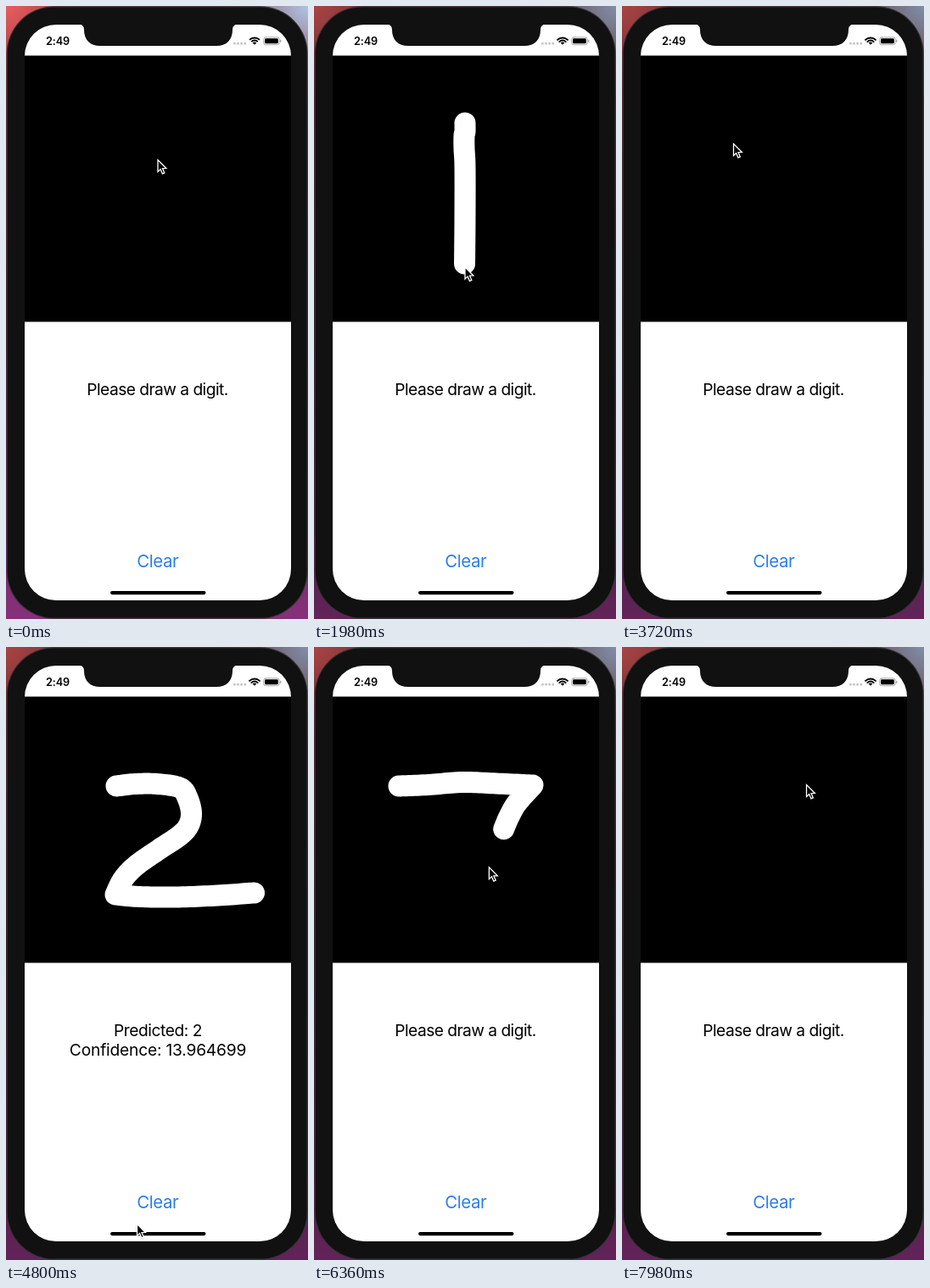
Recreate the animation shown at these times as an HTML page with a canvas. Size 356 px wide and 723 px high, loop 8 s.

```html
<!DOCTYPE html>
<html lang="en">
<head>
<meta charset="utf-8">
<title>Digit drawing</title>
<style>
html, body { margin: 0; width: 100%; height: 100%; overflow: hidden; background: #111; }
canvas { display: block; width: 356px; height: 723px; }
</style>
</head>
<body>
<canvas id="stage"></canvas>
<script>
const W = 356, H = 723, LOOP = 8000, STEP = 60, LAG = 75;
const FONT = 'Inter, Roboto, "Liberation Sans", sans-serif';
const canvas = document.getElementById('stage');
const dpr = window.devicePixelRatio || 1;
canvas.width = W * dpr;
canvas.height = H * dpr;
const ctx = canvas.getContext('2d');

const clamp = v => Math.max(0, Math.min(1, v));
const smooth = v => v * v * (3 - 2 * v);
const linear = v => v;

// Catmull-Rom curve; a repeated point makes a corner.
function curve(pts) {
  const out = [];
  for (let i = 0; i < pts.length - 1; i++) {
    const a = pts[Math.max(0, i - 1)], b = pts[i], c = pts[i + 1];
    const d = pts[Math.min(pts.length - 1, i + 2)];
    if (b[0] === c[0] && b[1] === c[1]) continue;
    for (let k = 0; k < 12; k++) {
      const u = k / 12;
      out.push([0, 1].map(j => 0.5 * (2 * b[j] + (c[j] - a[j]) * u +
        (2 * a[j] - 5 * b[j] + 4 * c[j] - d[j]) * u * u +
        (3 * b[j] - a[j] - 3 * c[j] + d[j]) * u * u * u)));
    }
  }
  out.push(pts[pts.length - 1]);
  return out;
}

// The part of a polyline up to a fraction of its length.
function partOf(line, p) {
  const gap = i => Math.hypot(line[i][0] - line[i - 1][0], line[i][1] - line[i - 1][1]);
  let left = 0;
  for (let i = 1; i < line.length; i++) left += gap(i);
  left *= p;
  const out = [line[0]];
  for (let i = 1; i < line.length; i++) {
    const len = gap(i);
    if (len >= left) {
      const u = len ? left / len : 0, a = line[i - 1], b = line[i];
      out.push([a[0] + (b[0] - a[0]) * u, a[1] + (b[1] - a[1]) * u]);
      break;
    }
    out.push(line[i]);
    left -= len;
  }
  return out;
}

const digits = [
  { from: 780, to: 1980, read: 2340, clear: 3240, ease: v => smooth(v) ** 1.84,
    label: '1', score: '7.4308753',
    line: curve([[178, 138], [178, 148], [177, 153], [177, 168], [178, 190], [178, 250], [177.5, 307.5]]) },
  { from: 3780, to: 4470, read: 4500, clear: 5580, ease: linear,
    label: '2', score: '13.964699',
    line: curve([[130, 164], [152, 161.5], [178, 161.5], [205, 166], [214, 178], [218.5, 196],
      [215, 211], [204, 223], [180, 239], [153, 258], [138, 274], [129, 292], [129, 292],
      [158, 294.5], [200, 295], [250, 293], [292.5, 290]]) },
  { from: 5940, to: 6445, read: 6540, clear: 7620, ease: linear,
    label: '7', score: '10.482617',
    line: curve([[100, 164], [135, 162.5], [175, 159.5], [215, 161], [258, 163], [258, 163],
      [240, 183], [231, 198], [224, 214], [206, 259], [189, 311]]) }
];
const progress = (d, t) => d.ease(clamp((t - d.from) / (d.to - d.from)));

// Pointer glides: start, end, x, y
const moves = [
  [0, 0, 178.5, 181], [0, 540, 177.5, 138],
  [2340, 3000, 199, 651], [3240, 3700, 131, 162],
  [4480, 4800, 154, 680], [4800, 5280, 181, 651], [5600, 5930, 100, 164],
  [6540, 7320, 173, 646], [7620, 7980, 217, 162]
];

function pointer(t) {
  let x = 0, y = 0;
  const stops = moves.map(m => ({ at: m[0], move: m }))
    .concat(digits.map(d => ({ at: d.from, digit: d })))
    .sort((a, b) => a.at - b.at);
  for (const s of stops) {
    if (t < s.at) break;
    if (s.digit) {
      const part = partOf(s.digit.line, progress(s.digit, t));
      [x, y] = part[part.length - 1];
    } else {
      const [a, b, tx, ty] = s.move;
      const u = b > a ? smooth(clamp((t - a) / (b - a))) : 1;
      x += (tx - x) * u;
      y += (ty - y) * u;
    }
  }
  return [x, y];
}

function box(x, y, w, h, r, color) {
  ctx.beginPath();
  ctx.roundRect(x, y, w, h, r);
  ctx.fillStyle = color;
  ctx.fill();
}

function text(str, x, y, size, color = '#000', track = 0, weight = 400) {
  ctx.font = `${weight} ${size}px ${FONT}`;
  ctx.letterSpacing = track + 'px';
  ctx.textAlign = 'center';
  ctx.fillStyle = color;
  ctx.fillText(str, x, y);
}

function glow(x, y, r, color) {
  const g = ctx.createRadialGradient(x, y, 0, x, y, r);
  g.addColorStop(0, color);
  g.addColorStop(1, color + '00');
  ctx.fillStyle = g;
  ctx.fillRect(0, 0, W, H);
}

function wallpaper(focused) {
  const g = ctx.createLinearGradient(0, 0, 0, H);
  g.addColorStop(0, '#8f3b45');
  g.addColorStop(0.5, '#4a2434');
  g.addColorStop(1, '#86307a');
  ctx.fillStyle = g;
  ctx.fillRect(0, 0, W, H);
  glow(0, 0, 100, '#e85d5c');
  glow(W, 0, 110, '#afc3e4');
  if (focused) {
    ctx.fillStyle = 'rgba(0,0,0,0.27)';
    ctx.fillRect(0, 0, W, H);
  }
}

function phone() {
  box(0.7, 0.3, 355, 722.4, 56, '#343436');
  box(1.8, 1.4, 352.8, 720.2, 55, '#111111');
  box(22, 22, 314, 679, 37, '#fff');
  ctx.fillStyle = '#111111';
  ctx.beginPath();
  ctx.moveTo(86, 21.5);
  ctx.quadraticCurveTo(92, 22, 92, 28);
  ctx.bezierCurveTo(92, 40, 99, 47, 111, 47);
  ctx.lineTo(248, 47);
  ctx.bezierCurveTo(260, 47, 267, 40, 267, 28);
  ctx.quadraticCurveTo(267, 22, 273, 21.5);
  ctx.fill();
}

function status() {
  text('2:49', 61, 45.8, 12.7, '#000', -0.1, 600);
  for (let i = 0; i < 4; i++) box(268 + i * 4.1, 42.8, 2.8, 2.8, 1.2, '#c4c4c4');
  ctx.strokeStyle = ctx.fillStyle = '#000';
  ctx.lineWidth = 2;
  const a = Math.PI * 1.25, b = Math.PI * 1.75;
  for (const r of [8.4, 5.2]) {
    ctx.beginPath();
    ctx.arc(293, 45.8, r, a, b);
    ctx.stroke();
  }
  ctx.beginPath();
  ctx.moveTo(293, 45.8);
  ctx.arc(293, 45.8, 3.2, a, b);
  ctx.fill();
  ctx.lineWidth = 0.9;
  ctx.strokeStyle = '#a0a0a0';
  ctx.beginPath();
  ctx.roundRect(303.6, 36.9, 18.6, 8.8, 2.6);
  ctx.stroke();
  box(305, 38.3, 15.8, 6, 1.4, '#000');
  box(323.1, 39.7, 1.2, 3.2, 0.6, '#a0a0a0');
}

function ink(t) {
  const d = digits.find(d => t >= d.from && t < d.clear);
  if (!d) return;
  const part = partOf(d.line, progress(d, t - LAG));
  ctx.strokeStyle = '#fff';
  ctx.lineWidth = 25;
  ctx.lineCap = ctx.lineJoin = 'round';
  ctx.beginPath();
  ctx.moveTo(...part[0]);
  part.slice(1).forEach(p => ctx.lineTo(...p));
  ctx.stroke();
}

function labels(t) {
  const d = digits.find(d => t >= d.read && t < d.clear);
  if (d) {
    text('Predicted: ' + d.label, 179, 458.8, 19.2, '#000', -0.45);
    text('Confidence: ' + d.score, 179, 482.3, 19.2, '#000', -0.2);
  } else {
    text('Please draw a digit.', 178.5, 458.8, 19.2, '#000', -0.55);
  }
  const pressed = digits.find(d => t >= d.clear - 60 && t < d.clear + 300);
  ctx.globalAlpha = pressed ? 0.25 + 0.75 * clamp((t - pressed.clear) / 300) : 1;
  text('Clear', 178.7, 661.8, 20.4, '#2c7ee8', -0.4);
  ctx.globalAlpha = 1;
  box(123, 690, 112.5, 4.2, 2.1, '#000');
}

function arrow(x, y) {
  ctx.save();
  ctx.translate(x, y);
  ctx.beginPath();
  [[0.5, 0.5], [0.5, 14.4], [3.6, 11.5], [5.9, 16.8], [8.3, 15.8], [6, 10.6], [10.4, 10.5]]
    .forEach(p => ctx.lineTo(...p));
  ctx.closePath();
  ctx.lineJoin = 'miter';
  ctx.lineWidth = 1.3;
  ctx.strokeStyle = '#fff';
  ctx.shadowColor = 'rgba(0,0,0,0.4)';
  ctx.shadowBlur = 2 * dpr;
  ctx.shadowOffsetY = dpr;
  ctx.fillStyle = '#000';
  ctx.fill();
  ctx.shadowColor = 'transparent';
  ctx.stroke();
  ctx.restore();
}

function draw(t) {
  ctx.setTransform(dpr, 0, 0, dpr, 0, 0);
  wallpaper(t >= 780);
  phone();
  status();
  box(22, 58.5, 314, 314, 0, '#000');
  ink(t);
  labels(t);
  arrow(...pointer(t));
}

const start = performance.now();
function tick() {
  const t = (performance.now() - start) % LOOP;
  draw(Math.floor(t / STEP) * STEP);
  requestAnimationFrame(tick);
}
tick();
</script>
</body>
</html>
```
